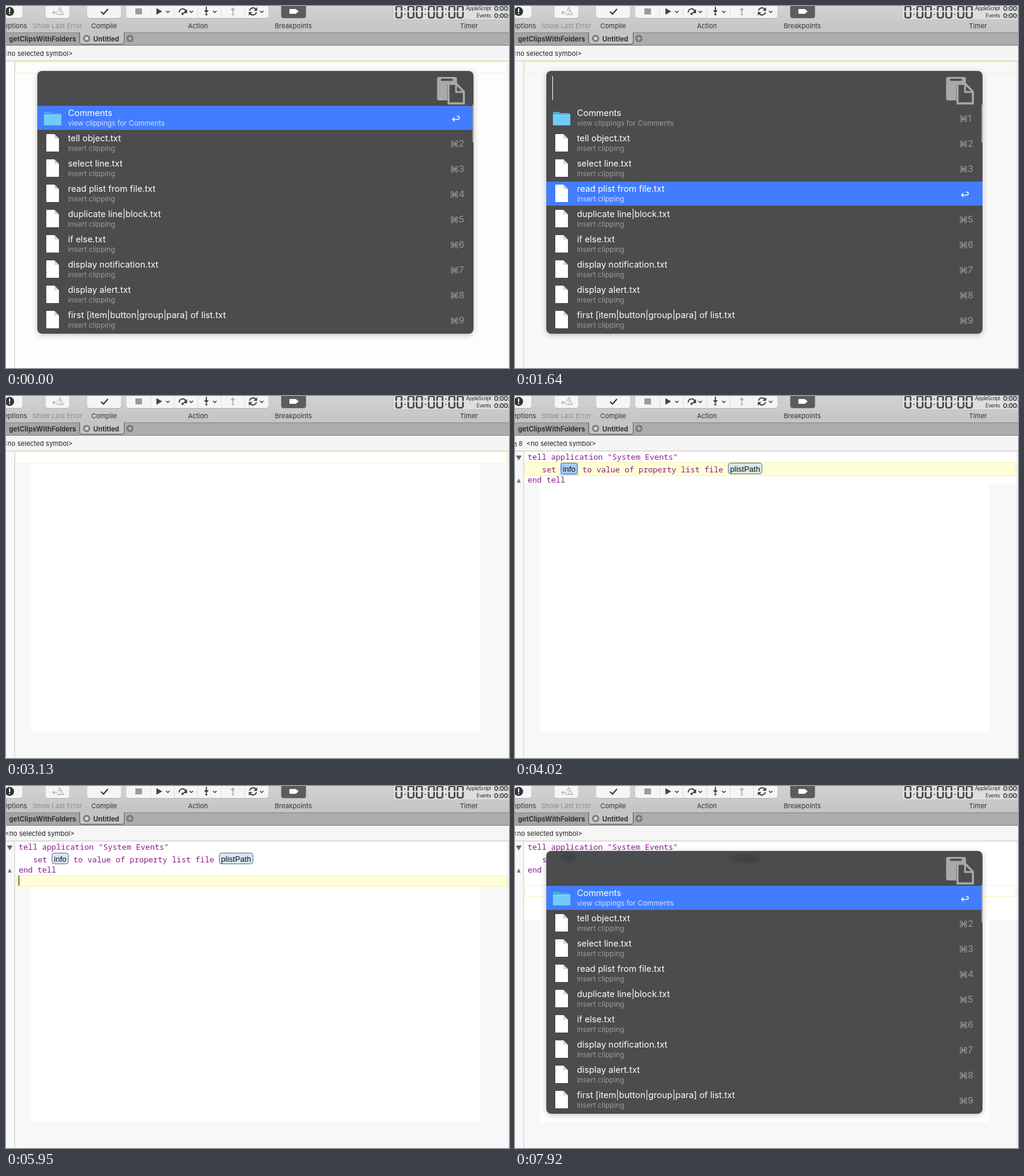
Write an HTML page that moves like this. It is 836 px wide and 602 px high and loops after 8000 ms.

```html
<!DOCTYPE html>
<html lang="en">
<head>
<meta charset="utf-8">
<title>Clippings menu</title>
<style>
html, body { margin: 0; width: 836px; height: 602px; overflow: hidden; background: #f8f8f8; }
svg { display: block; }
text { font-family: Inter, sans-serif; white-space: pre; }
.label { font-size: 11px; fill: #333; }
.tab { font-size: 11.2px; font-weight: 700; fill: #333; }
.code { font: 500 13px "Noto Sans Mono", monospace; fill: #8a1b8c; }
.token { font: 13px "Liberation Sans", sans-serif; fill: #111; }
.title { font-size: 14.45px; fill: #fff; }
.sub { font-size: 11.75px; fill: #9c9c9c; }
.key { font-size: 15px; fill: #999; }
.line { fill: none; stroke-linecap: round; stroke-linejoin: round; }
.selected .sub { fill: #d3e1ff; }
.bar, .enter { display: none; }
.selected .bar, .selected .enter { display: inline; }
.selected .shortcut { display: none; }
#panel { filter: drop-shadow(0 2px 5px rgba(0, 0, 0, .24)); }
</style>
</head>
<body>
<svg id="stage" width="836" height="602" viewBox="0 0 836 602"></svg>
<script>
const PERIOD = 8000;
const files = ["tell object", "select line", "read plist from file", "duplicate line|block", "if else",
  "display notification", "display alert", "first [item|button|group|para] of list"];

const rect = (x, y, w, h, fill, more = "") =>
  `<rect x="${x}" y="${y}" width="${w}" height="${h}" fill="${fill}" ${more}/>`;
const text = (x, y, cls, str, more = "") =>
  `<text x="${x}" y="${y}" class="${cls}" ${more}>${str.replace(/</g, "&lt;")}</text>`;
const path = (d, stroke, width = 1.5, more = "") =>
  `<path class="line" d="${d}" stroke="${stroke}" stroke-width="${width}" ${more}/>`;
const shape = (d, fill) => `<path d="${d}" fill="${fill}"/>`;
const circle = (x, y, r, fill, more = "") => `<circle cx="${x}" cy="${y}" r="${r}" fill="${fill}" ${more}/>`;
const group = (id, body, more = "") => `<g id="${id}" ${more}>${body}</g>`;
const middle = 'text-anchor="middle"', end = 'text-anchor="end"';

function lcd() {
  const zero = x => path(`M${x + 3} .5h6M${x + 1.5} 2v5M${x + 10.5} 2v5M${x + 1.5} 11v7M${x + 10.5} 11v7M${x + 3} 19.5h6`, "#454545", 2.7);
  const colon = x => rect(x, 4, 2, 2, "#555") + rect(x, 13, 2, 2, "#555");
  return [647, 667, 681, 701, 715, 735, 749].map(zero).join("") + [662, 696, 730].map(colon).join("");
}

function toolbar() {
  const button = (x, w, fill = "#f5f5f5") =>
    rect(x, -8, w, 28.7, "#a9a9a9", 'rx="4"') + rect(x, -8, w, 28, fill, 'rx="4"');
  const chevron = x => path(`M${x - 2.5} 8.5l2.5 2.5 2.5-2.5`, "#444", 1.6);
  const ink = "#444", pale = "#b3b3b3";
  return rect(0, 0, 836, 45, "url(#chrome)") +
    button(-10, 37) + button(66, 39) + button(135, 56) + button(200, 236) + button(457.5, 41, "#5c5c5c") +
    [240, 279, 318, 357, 396].map(x => rect(x, 0, 1, 20, "#dcdcdc")).join("") +
    circle(6, 9, 7.5, "#333") + rect(5, 4, 2, 6, "#fff") + rect(5, 11.5, 2, 2, "#fff") +
    path("M85 14h10.5l-6-11.5-3 5.5M90 7v3M90 12v.2M85 11h-7.500l2.500-2.500M77.500 11l2.500 2.500", pale, 1.3) +
    path("M158.500 10l3.500 3.500 7-8", "#333", 2) +
    rect(215, 4, 11, 10, "#9b9b9b") +
    shape("M250 3.500l9.500 5.500-9.500 5.500z", ink) +
    path("M288 10a5.500 5.500 0 0 1 10.500-2", ink, 2) + shape("M301 5v7h-7z", ink) + circle(293.5, 13, 2, ink) +
    path("M333 2v6", ink, 2) + shape("M329 7h8l-4 5z", ink) + circle(333, 14, 1.8, ink) +
    path("M377 6v5", pale, 2) + shape("M373 7h8l-4-5z", pale) + circle(377, 14, 1.8, pale) +
    path("M405 7a6 6 0 0 1 10-2M416 11a6 6 0 0 1-10 2", ink, 2) +
    shape("M417.500 2v6h-6z", ink) + shape("M403.500 16v-6h6z", ink) +
    [269, 308, 347, 425].map(chevron).join("") +
    shape("M472 5h9.500l5 4-5 4h-9.500q-1 0-1-1v-6q0-1 1-1z", "#fff") +
    rect(643, -5, 200, 28, "#dedede", 'rx="3" stroke="#bdbdbd"') + lcd() +
    text(806, 7, "label", "AppleScript", end + ' style="font-size:8.5px;letter-spacing:-.5px"') +
    text(806, 19, "label", "Events", end + ' style="font-size:8.5px;letter-spacing:-.5px"') +
    [8, 20].map(y => text(811, y, "label", "0:00:00", 'style="font-weight:600;letter-spacing:-.6px"')).join("") +
    text(35, 37, "label", "Exceptions", end) +
    text(44, 37, "label", "Show Last Error", 'style="fill:#8d8d8d"') +
    [[163, "Compile"], [319, "Action"], [477.5, "Breakpoints"], [769.5, "Timer"]]
      .map(([x, s]) => text(x, 37, "label", s, middle)).join("");
}

function tabs() {
  return rect(0, 44, 836, 22, "#acacac") + rect(0, 44, 836, 1, "#858585") + rect(0, 65, 836, 1, "#7d7d7d") +
    rect(0, 45, 122, 20, "#a5a5a5") +
    `<path d="M122.500 44v16q0 3.500 3.500 3.500h67q3.500 0 3.500-3.500v-16" fill="#c5c5c5" stroke="#555"/>` +
    text(116.5, 58.5, "tab", "getClipsWithFolders", end) + text(145, 58.5, "tab", "Untitled") +
    circle(134, 54, 4.5, "#d5d5d5", 'stroke="#7c7c7c" stroke-width="3"') +
    circle(206, 54, 6, "#777") + path("M203 54h6M206 51v6", "#c4c4c4", 1.6) +
    rect(0, 66, 836, 26, "#f5f5f5") + rect(0, 91, 836, 1, "#c3c3c3") +
    text(111, 83, "label", "<no selected symbol>", end + ' id="symbol" style="fill:#222"') +
    group("delta", path("M-2 83l3.500-6 1 6z", "#333", 1) + text(6, 83, "label", "8"));
}

function editor() {
  const token = (id, x, w, str) => rect(x + .5, 111.5, w - 1, 18, "#d8e6fb", `id="${id}" rx="4" stroke="#5c6d7c"`) +
    text(x + w / 2, 126, "token", str, middle);
  return rect(0, 92, 836, 510, "#f8f8f8", 'id="page"') +
    group("cleared", rect(41, 92, 747, 467, "#fff") + rect(15, 92, 819, 10, "#fff", 'id="strip"')) +
    rect(16.5, 93.5, 816, 17, "#ffffd6", 'id="current"') +
    rect(14, 92, 1, 510, "#cbcbcb") + rect(834, 92, 1, 510, "#e6e6e6") +
    group("script",
      shape("M1.500 99h9.500l-4.750 8z", "#666") + shape("M3 144h6.500l-3.250-7z", "#777") +
      text(21, 106, "code", 'tell application "System Events"') +
      text(45, 127, "code", "set") + text(112, 127, "code", "to value of property list file") +
      text(21, 144, "code", "end tell") +
      rect(75, 111, 30, 21, "#b4d5fd", 'id="halo"') +
      token("info", 76, 28, "info") + token("plist", 354, 57, "plistPath")) +
    rect(21, 94, 1, 17, "#000", 'id="caret"');
}

const clipboard = (place, back) => `<g transform="${place}">` +
  shape("M3 0h27q3 0 3 3v10h-16v26h-14q-3 0-3-3v-33q0-3 3-3zM6.500 3v3.500h19.500v-3.500z", "#a9a9a9") +
  `<path d="M19 11.500h13l12.500 13v19.500h-25.500z" fill="${back}" stroke="#a9a9a9" stroke-width="3.400"/>` +
  path("M31.500 12v13h12.500", "#a9a9a9", 3) + "</g>";

const folder = shape("M63 179q0-3 3-3h7l2 2h14q3 0 3 3v15h-29z", "#48aee2") +
  rect(63, 181, 29, 17.5, "#72cbf7", 'rx="1.500"') + rect(63, 181, 29, 1, "#9bdcfb");
const sheet = shape("M67 171h13.500l7.500 7.500v21.500h-21z", "#fff") + shape("M80.500 171v7.500h7.500z", "#d4d4d4");
const enter = path("M742.500 188.500h8.500a2.500 2.500 0 0 0 0-5h-1M745 185.500l-3 3 3 3", "#fff", 1.4, 'style="display:inherit"');
const command = path("M743.500 184.500v6a1.900 1.900 0 1 1-1.900-1.900h7.400a1.900 1.900 0 1 1-1.900 1.900v-6a1.900 1.900 0 1 1 1.900 1.900h-7.400a1.900 1.900 0 1 1 1.900-1.900z", "#999", 1.1);

function row(i, icon, title, sub, cls = "row") {
  return `<g class="${cls}" transform="translate(0 ${42 * i})">` +
    rect(52, 166, 725, 40, "#427dff", 'class="bar"') + icon +
    text(103, 183, "title", title) + text(103, 199, "sub", sub) +
    `<g class="enter">${enter}</g><g class="shortcut">${command}${text(752.5, 192, "key", String(i + 1))}</g></g>`;
}

function popup() {
  return group("popup",
    rect(52, 108, 725, 437, "#4b4c4d", 'id="panel" rx="8"') +
    group("smudge", `<ellipse cx="89" cy="118" rx="14" ry="8"/><ellipse cx="382" cy="120" rx="26" ry="8"/>`,
      'fill="#414244" filter="url(#soft)"') +
    clipboard("translate(716.500 118)", "#4b4c4d") +
    group("list", row(0, folder, "Comments", "view clippings for Comments") +
      files.map((f, i) => row(i + 1, sheet, f + ".txt", "insert clipping")).join("") +
      rect(775, 164, 2, 63, "#959595")) +
    group("loading", row(0, clipboard("translate(65 176) scale(.56)", "#427dff"),
      "Get macro organizer clippings", "getting clippings...", "selected")) +
    rect(62, 117, 1, 39, "#fff", 'id="cursor"'));
}

document.getElementById("stage").innerHTML = `<defs>
  <linearGradient id="chrome" x2="0" y2="1"><stop stop-color="#d2d2d2"/><stop offset="1" stop-color="#c3c3c3"/></linearGradient>
  <filter id="soft" x="-50%" y="-100%" width="200%" height="300%"><feGaussianBlur stdDeviation="2.200"/></filter></defs>` +
  toolbar() + tabs() + editor() + popup();

// Each step overrides part of the state before it.
const steps = [
  [0, { popup: "list", row: 0, cursor: 0, page: "#fdfdfd", lineY: 93, lineH: 18, focus: 0, script: 0, strip: 112, caret: null, symbol: 111 }],
  [590, { cursor: 1 }],
  [1040, { cursor: 0 }],
  [1340, { row: 1 }],
  [1490, { row: 2 }],
  [1640, { row: 3, cursor: 1, page: "#f8f8f8" }],
  [2240, { cursor: 0 }],
  [2830, { cursor: 1 }],
  [3130, { popup: null }],
  [3280, { focus: 1, caret: [21, 94] }],
  [3720, { script: 1, picked: 1, lineY: 110, lineH: 22, strip: 145, caret: null }],
  [4020, { symbol: 134.5 }],
  [4770, { picked: 0, lineY: 131, lineH: 18, strip: 150, caret: [75, 132] }],
  [5060, { symbol: 114 }],
  [5360, { caret: null }],
  [5650, { caret: [83, 132] }],
  [5950, { lineY: 148, strip: 167, caret: [21, 149] }],
  [6100, { lineY: 165, strip: 184, caret: [21, 166] }],
  [6250, { symbol: 112 }],
  [6550, { caret: null }],
  [7150, { caret: [21, 166] }],
  [7290, { popup: "loading", row: 0, cursor: 1, focus: 0, strip: 223, caret: null }],
  [7440, { popup: "list" }],
  [7920, { cursor: 0 }]
];

const $ = id => document.getElementById(id);
const show = (id, on) => { $(id).style.display = on ? "" : "none"; };
const set = (id, attrs) => { for (const k in attrs) $(id).setAttribute(k, attrs[k]); };
const rows = [...document.querySelectorAll(".row")];

function render(s, t) {
  show("popup", s.popup);
  show("list", s.popup === "list");
  show("loading", s.popup === "loading");
  show("cursor", s.cursor);
  show("smudge", s.script);
  show("cleared", t >= 3130);
  show("script", s.script);
  show("halo", s.picked);
  show("delta", s.symbol > 130);
  show("caret", s.caret);
  if (s.caret) set("caret", { x: s.caret[0], y: s.caret[1] });
  set("panel", { height: s.popup === "loading" ? 101 : 437 });
  set("page", { fill: s.page });
  set("strip", { height: s.strip - 92 });
  set("current", { y: s.lineY + .5, height: s.lineH, fill: s.focus ? "#ffffd6" : "none", stroke: s.focus ? "#f3efb4" : "#f8f3c8" });
  set("info", { fill: s.picked ? "#a6cbfa" : "#d8e6fb" });
  set("plist", { fill: s.picked ? "#d9e8e6" : "#d8e6fb" });
  set("symbol", { x: s.symbol });
  rows.forEach((r, i) => r.classList.toggle("selected", i === s.row));
}

const start = performance.now();
let last = -1;
function tick() {
  const t = (performance.now() - start) % PERIOD;
  const past = steps.filter(([at]) => at <= t);
  if (past.length !== last) {
    last = past.length;
    render(Object.assign({}, ...past.map(([, change]) => change)), t);
  }
  requestAnimationFrame(tick);
}
tick();
</script>
</body>
</html>
```
